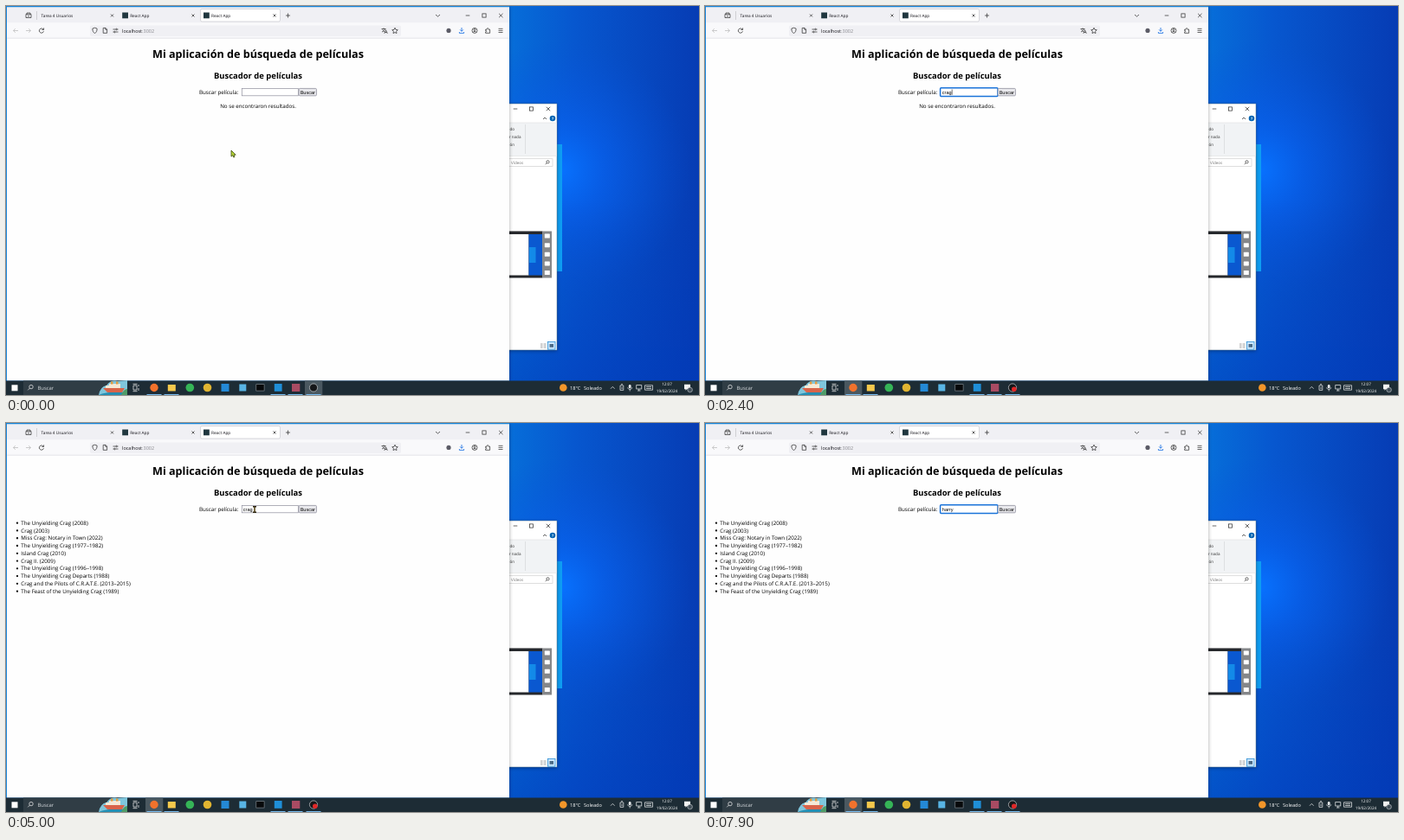
Recreate the animation shown at these times as an HTML page. Size 800 px wide and 450 px high, loop 8 s.

```html
<!DOCTYPE html>
<html lang="es">
<head>
<meta charset="utf-8">
<title>Buscador de películas</title>
<style>
html, body { margin: 0; width: 100%; height: 100%; overflow: hidden; background: #0a4cc4; }
svg { display: block; width: 800px; height: 450px; }
text { font-family: "Open Sans", "Noto Sans", sans-serif; text-rendering: geometricPrecision; white-space: pre; }
.form { font-family: "Liberation Sans", Arial, sans-serif; font-size: 5.55px; }
.page { font-size: 6.22px; }
.tab { font-size: 4.75px; fill: #15141a; }
.small { font-size: 4.6px; }
.line { fill: none; stroke: #333; stroke-width: .75; }
</style>
</head>
<body>
<svg id="stage" viewBox="0 0 800 450" xmlns="http://www.w3.org/2000/svg">
  <defs>
    <linearGradient id="sky">
      <stop offset=".7" stop-color="#0674dc"/><stop offset=".82" stop-color="#0757cf"/><stop offset="1" stop-color="#063cb4"/>
    </linearGradient>
    <radialGradient id="glow" gradientUnits="userSpaceOnUse" cx="640" cy="190" r="150">
      <stop offset="0" stop-color="#0872ff"/><stop offset=".35" stop-color="#0860ee" stop-opacity=".7"/><stop offset="1" stop-color="#0850d8" stop-opacity="0"/>
    </radialGradient>
    <linearGradient id="dusk" x2="0" y2="1">
      <stop offset=".5" stop-color="#0038b8" stop-opacity="0"/><stop offset="1" stop-color="#0038b8" stop-opacity=".55"/>
    </linearGradient>
    <filter id="shade" x="-20%" y="-20%" width="140%" height="140%"><feDropShadow dx="0" dy="1" stdDeviation="2" flood-opacity=".35"/></filter>
    <clipPath id="shipClip"><rect x="107" y="433" width="33" height="17"/></clipPath>
  </defs>
  <g id="desktop"></g>
  <g id="explorer"></g>
  <g id="browser"></g>
  <g id="page"></g>
  <g id="taskbar"></g>
  <g id="pointer">
    <path id="arrow" d="M0 0V7.2L1.7 5.7 2.8 8.1 4 7.5 3 5.2H5.2Z" fill="#b5d334" stroke="#3c4a12" stroke-width=".8" stroke-linejoin="round"/>
    <g id="beam" fill="none">
      <path d="M-2-3.2H2M0-3.2V3.2M-2 3.2H2" stroke="#2b2410" stroke-width="1.5"/>
      <path d="M0-2.6V2.6" stroke="#c9a53a" stroke-width=".5"/>
    </g>
  </g>
</svg>
<script>
const $ = id => document.getElementById(id);
const NS = 'http://www.w3.org/2000/svg';
let layer;

function add(tag, attrs, content) {
  const node = document.createElementNS(NS, tag);
  for (const key in attrs) node.setAttribute(key, attrs[key]);
  if (content !== undefined) node.textContent = content;
  layer.appendChild(node);
  return node;
}
const rect = (x, y, width, height, fill, more) => add('rect', { x, y, width, height, fill, ...more });
const disc = (cx, cy, r, fill, more) => add('circle', { cx, cy, r, fill, ...more });
const line = (d, more) => add('path', { d, class: 'line', ...more });
const text = (x, y, content, more) => add('text', { x, y, ...more }, content);
const cross = (x, y, r, stroke = '#333') => line(`M${x - r} ${y - r}l${2 * r} ${2 * r}m0 ${-2 * r}l${-2 * r} ${2 * r}`, { stroke });
const lens = (x, y, r, stroke) => line(`M${x - r * 1.7} ${y + r * 1.7}L${x - r * .7} ${y + r * .7}M${x - r} ${y}a${r} ${r} 0 1 1 ${2 * r} 0a${r} ${r} 0 1 1 ${-2 * r} 0`, { style: `stroke:${stroke}` });
function windowButtons(xs, y) {
  line(`M${xs[0] - 2.3} ${y}h4.6`);
  rect(xs[1] - 2.1, y - 2.1, 4.2, 4.2, 'none', { class: 'line' });
  cross(xs[2], y, 2.2);
}

function drawDesktop() {
  layer = $('desktop');
  for (const fill of ['sky', 'glow', 'dusk']) rect(0, 0, 800, 450, `url(#${fill})`);
  rect(560, 160, 82, 147, '#0e9df2');
}

function drawExplorer() {
  layer = $('explorer');
  rect(560, 113, 76, 285, '#fff', { filter: 'url(#shade)' });
  rect(560, 113, 76, 285, '#fff', { stroke: '#56748f', 'stroke-width': .5 });
  windowButtons([588, 606.5, 626], 119);
  line('M620 131l2-2 2 2');
  disc(631, 130, 3.3, '#0063b1');
  text(631, 131.8, '?', { class: 'small', fill: '#fff', 'text-anchor': 'middle', 'font-weight': 700 });
  rect(560, 135, 75.7, 38.5, '#f1f3f5', { stroke: '#dadbdc', 'stroke-width': .5 });
  line('M599.5 137v34', { style: 'stroke:#d6d8da' });
  [['do', 587, 143.5], ['r nada', 594.5, 152.5], ['ón', 587, 161.5]].forEach(([word, x, y]) =>
    text(x, y, word, { class: 'small', fill: '#333', 'text-anchor': 'end' }));
  rect(560, 176.7, 71, 8.8, '#fff', { stroke: '#d0d0d0', 'stroke-width': .7 });
  text(583, 182.8, 'Vídeos', { class: 'small', fill: '#777' });
  lens(625.5, 180.4, 1.6, '#333');
  rect(560, 260.5, 59.5, 54, '#26282c');
  rect(560, 264, 43.5, 47.5, '#fff');
  rect(603.5, 264, 15.5, 47.5, '#0a58d0');
  rect(604, 279, 7.5, 18, '#138ae8');
  rect(619.5, 260.5, 10.5, 54, '#85878a');
  for (let i = 0; i < 5; i++) rect(621.8, 263.6 + i * 10.6, 6, 5, '#fff', { rx: .6 });
  for (let i = 0; i < 3; i++) line(`M617 ${391 + i * 2}h2.6m1 0h3`, { style: 'stroke:#888' });
  rect(625.5, 388.5, 8.5, 8.7, '#cce8ff', { stroke: '#2a8dd4', 'stroke-width': .8 });
  rect(627.5, 391, 4.5, 3.8, '#4b6a86');
}

function drawBrowser() {
  layer = $('browser');
  rect(0, 0, 581, 433.5, '#1683d8', { filter: 'url(#shade)' });
  rect(1, 1.5, 580, 432, '#fefefe');
  rect(1, 1.5, 580, 18, '#f0f0f4');
  rect(1, 19.5, 580, 17.5, '#f9f9fb');
  line('M1 37.2H581', { style: 'stroke:#d2d2d8;stroke-width:.6' });

  rect(224.5, 3.5, 92, 14.5, '#fff', { rx: 1.7, stroke: '#c9c9cf', 'stroke-width': .7 });
  line('M35.5 6v10', { style: 'stroke:#c4c4ca' });
  line('M23 9.5h6v4h-6zM24 9.2v-1.2h4v1.2M24.8 11l1.2 1.1 1.2-1.1');
  text(40.5, 12.7, 'Tarea 4 Usuarios', { class: 'tab' });
  for (const x of [134.2, 228]) {
    rect(x, 7.5, 6.8, 6.8, '#20373f');
    text(x + 9, 12.7, 'React App', { class: 'tab' });
  }
  for (const x of [122.5, 216, 310]) cross(x, 11, 1.5);
  line('M323 11h5M325.5 8.5v5M496 10l2.5 2.2 2.5-2.2');
  windowButtons([533, 552, 571.3], 11);

  const faint = { style: 'stroke:#bbb' };
  line('M14 28.5h-5.5m2.3-2.3l-2.3 2.3 2.3 2.3', faint);
  line('M23 28.5h5.5m-2.3-2.3l2.3 2.3-2.3 2.3', faint);
  line('M43.2 27.2a2.6 2.6 0 1 0 .3 2M43.6 25.4v2.1h-2.1');
  rect(97, 22.5, 359, 12.5, '#f0f0f4', { rx: 1.7 });
  line('M102.5 25.2l2.6.9c0 3-.7 4.4-2.6 5.4-1.9-1-2.6-2.4-2.6-5.4z');
  line('M112.2 25.4h2.8l1.6 1.7v4.2h-4.4zM114.8 25.4v1.9h1.8');
  line('M123.5 27h3.3m1.7 0h1M123.5 30h1m1.8 0h3.2M128.4 27a.8.8 0 1 0-1.6 0 .8.8 0 0 0 1.6 0M126.2 30a.8.8 0 1 0-1.6 0 .8.8 0 0 0 1.6 0');
  const url = text(134, 30.6, '', { 'font-size': 5.5, fill: '#15141a' });
  url.innerHTML = 'localhost<tspan fill="#86868c">:3002</tspan>';
  line('M433.5 26.5h5M436 25.5v1M434 30c2-1 3-2 3.6-3.5M434.6 27.5l2.3 2.2M436.8 31.8l1.7-4 1.8 4m-.6-1.3h-2.3');
  line('M449 25.2l1 2.2 2.3.3-1.7 1.6.4 2.3-2-1.1-2 1.1.4-2.3-1.7-1.6 2.3-.3z');
  disc(511, 28.4, 2.6, '#5b5b66');
  line('M526 25v4.2m-1.9-1.8l1.9 1.9 1.9-1.9M523.4 30v1.4h5.2V30', { style: 'stroke:#0061e0' });
  disc(541, 28.4, 3, 'none', { class: 'line' });
  line('M539 30.5c.7-1.5 3.3-1.5 4 0M542 27.5a1 1 0 1 0-2 0 1 1 0 0 0 2 0');
  line('M553.6 27.2h1.6c-.4-2.2 2.2-2.2 1.8 0h1.6v4.1h-5v-1.4c1.6.2 1.6-1.6 0-1.4z');
  line('M568.5 26.3h5m-5 2.1h5m-5 2.1h5');
}

const titles = [
  'The Unyielding Crag (2008)', 'Crag (2003)', 'Miss Crag: Notary in Town (2022)',
  'The Unyielding Crag (1977–1982)', 'Island Crag (2010)', 'Crag II. (2009)',
  'The Unyielding Crag (1996–1998)', 'The Unyielding Crag Departs (1988)',
  'Crag and the Pilots of C.R.A.T.E. (2013–2015)', 'The Feast of the Unyielding Crag (1989)'
];
const ui = {};

function drawPage() {
  const root = layer = $('page');
  const heading = { 'font-weight': 700, 'text-anchor': 'middle' };
  text(291, 60.3, 'Mi aplicación de búsqueda de películas', { ...heading, 'font-size': 12.6 });
  text(291, 83.6, 'Buscador de películas', { ...heading, 'font-size': 9.45 });
  text(223, 101.8, 'Buscar película:', { class: 'page' });
  ui.ring = rect(271.6, 94.7, 66.4, 9.8, '#fff', { rx: 1, stroke: '#1a73d9', 'stroke-width': 1.5 });
  ui.field = rect(272.3, 95.4, 65, 8.4, '#fff', { stroke: '#8f8f9d', 'stroke-width': .7 });
  ui.selection = rect(273.8, 96.2, 10.8, 6.8, '#0078d7');
  ui.value = text(273.8, 101.7, '', { class: 'form' });
  ui.caret = rect(0, 96.5, .6, 6.3, '#111');
  ui.button = rect(338.2, 95.4, 20.2, 8.4, '#e9e9ed', { rx: 1, stroke: '#8f8f9d', 'stroke-width': .8 });
  text(348.3, 101.6, 'Buscar', { class: 'form', 'text-anchor': 'middle' });
  ui.empty = text(291, 117.8, 'No se encontraron resultados.', { class: 'page', 'text-anchor': 'middle' });
  ui.results = layer = add('g', {});
  titles.forEach((title, i) => {
    const y = 117.8 + i * 8.77;
    disc(13, y - 2.1, 1.15, '#000');
    text(17.3, y, title, { class: 'page' });
  });
  layer = root;
}

function drawTaskbar() {
  layer = $('taskbar');
  rect(0, 433.5, 800, 16.5, '#1d2c35');
  rect(6.5, 438.3, 7, 7, '#fff');
  rect(20, 433.5, 120, 16.5, '#303d45');
  lens(29, 440.6, 2.2, '#e8e8e8');
  text(36.5, 444, 'Buscar', { 'font-size': 5.9, fill: '#d8dcdf' });

  const bar = layer;
  layer = add('g', { 'clip-path': 'url(#shipClip)' });
  add('path', { d: 'M107 450q2-10 9-11q5-7 13-5l11-1v17z', fill: '#7fc6dc' });
  add('path', { d: 'M107 450q10-5 33-3v3z', fill: '#238eb3' });
  add('path', { d: 'M112 442h25l-3 5h-17z', fill: '#d9644a' });
  add('path', { d: 'M115 442v-3h4v-2h13v5z', fill: '#f5ead7' });
  rect(121, 434.5, 2.5, 3, '#e39a3c');
  rect(127, 434.5, 2.5, 3, '#e39a3c');
  add('path', { d: 'M133 450q3-7 7-7v7z', fill: '#4f9c67' });
  layer = bar;

  ui.browserTile = rect(161, 433.5, 20.3, 16.5, '#4a5860');
  ui.recorderTile = rect(345, 433.5, 20.3, 16.5, '#4a5860');
  line('M147 439h4v5h-4zM153 438v2m0 2v3M146.5 437.3h5m-5 8.4h5', { style: 'stroke:#e8e8e8' });
  disc(171, 441.5, 4.7, '#f2722c');
  rect(186.8, 438, 9, 7.5, '#f5c84c');
  disc(212.3, 441.5, 4.8, '#35b457');
  disc(232.5, 441.5, 4.8, '#e0b431');
  rect(248.5, 437, 9, 9, '#2489d6');
  rect(269.3, 437.5, 8, 8, '#58b4e4');
  rect(288.8, 437.7, 9.3, 7.4, '#07090b', { stroke: '#8c959b', 'stroke-width': .6 });
  rect(309.8, 437, 8.8, 8.8, '#1f8fd8');
  rect(330, 437, 9.3, 9, '#a94b63');
  disc(355, 441.5, 4.6, '#151719', { stroke: '#c9cdd0', 'stroke-width': .7 });
  ui.recording = disc(356.8, 443.2, 2.8, '#e02828');
  for (const x of [171, 191, 314, 334, 355]) rect(x - 8.5, 449, 17, 1, '#76b9ed');

  disc(643.3, 441.5, 4.3, '#f2962a');
  text(651, 443.7, '18°C', { 'font-size': 5.6, fill: '#fff' });
  text(667, 443.7, 'Soleado', { 'font-size': 5.6, fill: '#fff' });
  const pale = { style: 'stroke:#e4e7e9' };
  line('M698 442.7l2.3-2.3 2.3 2.3', pale);
  line('M709 439h3.8v5.4H709zM710 437.6h2M711 441v2', pale);
  rect(718.8, 438, 2.8, 4.5, '#e4e7e9', { rx: 1.4 });
  line('M717.7 441.3c.3 3 4.7 3 5 0M720.2 443.5v2', pale);
  line('M727.7 438.5h6v4.5h-6zM729 445h3.5m-1.8-2v2', pale);
  line('M737.5 438.8h9v5.4h-9zM739 440.6h6m-6 1.9h6', pale);
  const clock = { class: 'small', fill: '#fff', 'text-anchor': 'middle' };
  text(763, 439.4, '12:07', clock);
  text(763, 447.3, '19/02/2024', clock);
  add('path', { d: 'M783 437.7h7v5.5h-4l-1.5 1.6v-1.6H783z', fill: '#f2f2f2' });
  disc(789.6, 444, 2.8, '#43505a', { stroke: '#e4e7e9', 'stroke-width': .5 });
}

// Pointer stops: time, x, y
const stops = [
  [0, 260, 167], [100, 260, 167], [500, 293, 100], [2700, 293, 100], [3300, 347.5, 102],
  [3700, 347.5, 102], [4300, 268, 135], [4500, 268, 135], [5000, 287, 100],
  [5300, 287, 100], [5700, 245, 96.5], [8000, 245, 96.5]
];
const firstWord = { word: 'crag', start: 1300, step: 300 };
const secondWord = { word: 'harry', start: 6500, step: 200 };
const CLICK = 600, PRESS = 3500, RELEASE = 3700, RESULTS = 3900, REFOCUS = 5300;

function pointerAt(t) {
  const i = stops.findIndex((s, k) => k && t <= s[0]);
  const [t0, x0, y0] = stops[i - 1], [t1, x1, y1] = stops[i];
  const p = (t - t0) / (t1 - t0), e = p * p * (3 - 2 * p);
  return [x0 + (x1 - x0) * e, y0 + (y1 - y0) * e];
}
const typedCount = (t, { word, start, step }) => Math.max(0, Math.min(word.length, Math.floor((t - start) / step) + 1));
const show = (node, on) => node.setAttribute('visibility', on ? 'visible' : 'hidden');

function render(t) {
  const retyping = t >= secondWord.start;
  const entry = retyping ? secondWord : firstWord;
  const count = typedCount(t, entry);
  const focused = (t >= CLICK && t < PRESS) || t >= REFOCUS;
  const selected = t >= REFOCUS + 200 && !retyping;
  const lastKey = count ? entry.start + (count - 1) * entry.step : CLICK;
  const lastAction = t >= REFOCUS && !retyping ? REFOCUS : lastKey;
  const [x, y] = pointerAt(t);

  ui.value.textContent = entry.word.slice(0, count);
  ui.value.setAttribute('fill', selected ? '#fff' : '#000');
  ui.caret.setAttribute('x', 274 + (count ? ui.value.getComputedTextLength() : 0));
  show(ui.caret, focused && !selected && (t - lastAction) % 1000 < 500);
  show(ui.ring, focused);
  show(ui.field, !focused);
  show(ui.selection, selected);

  const pressed = t >= PRESS && t < RELEASE;
  const over = x > 338 && x < 358 && y > 95 && y < 104;
  ui.button.setAttribute('fill', pressed ? '#a9a9b3' : over ? '#d0d0d7' : '#e9e9ed');
  ui.button.setAttribute('stroke', pressed ? '#484851' : '#8f8f9d');
  show(ui.empty, t < RESULTS);
  show(ui.results, t >= RESULTS);
  show(ui.browserTile, t >= CLICK);
  show(ui.recorderTile, t < CLICK);
  show(ui.recording, t >= 200);

  const hidden = (t >= firstWord.start && t < 2800) || retyping;
  const overField = x > 272 && x < 338 && y > 95 && y < 104;
  $('pointer').setAttribute('transform', `translate(${x} ${y})`);
  show($('arrow'), !hidden && !overField);
  show($('beam'), !hidden && overField);
}

drawDesktop();
drawExplorer();
drawBrowser();
drawPage();
drawTaskbar();

const begin = performance.now();
function tick() {
  render(Math.floor((performance.now() - begin) % 8000 / 100) * 100);
  requestAnimationFrame(tick);
}
render(0);
requestAnimationFrame(tick);
</script>
</body>
</html>
```
